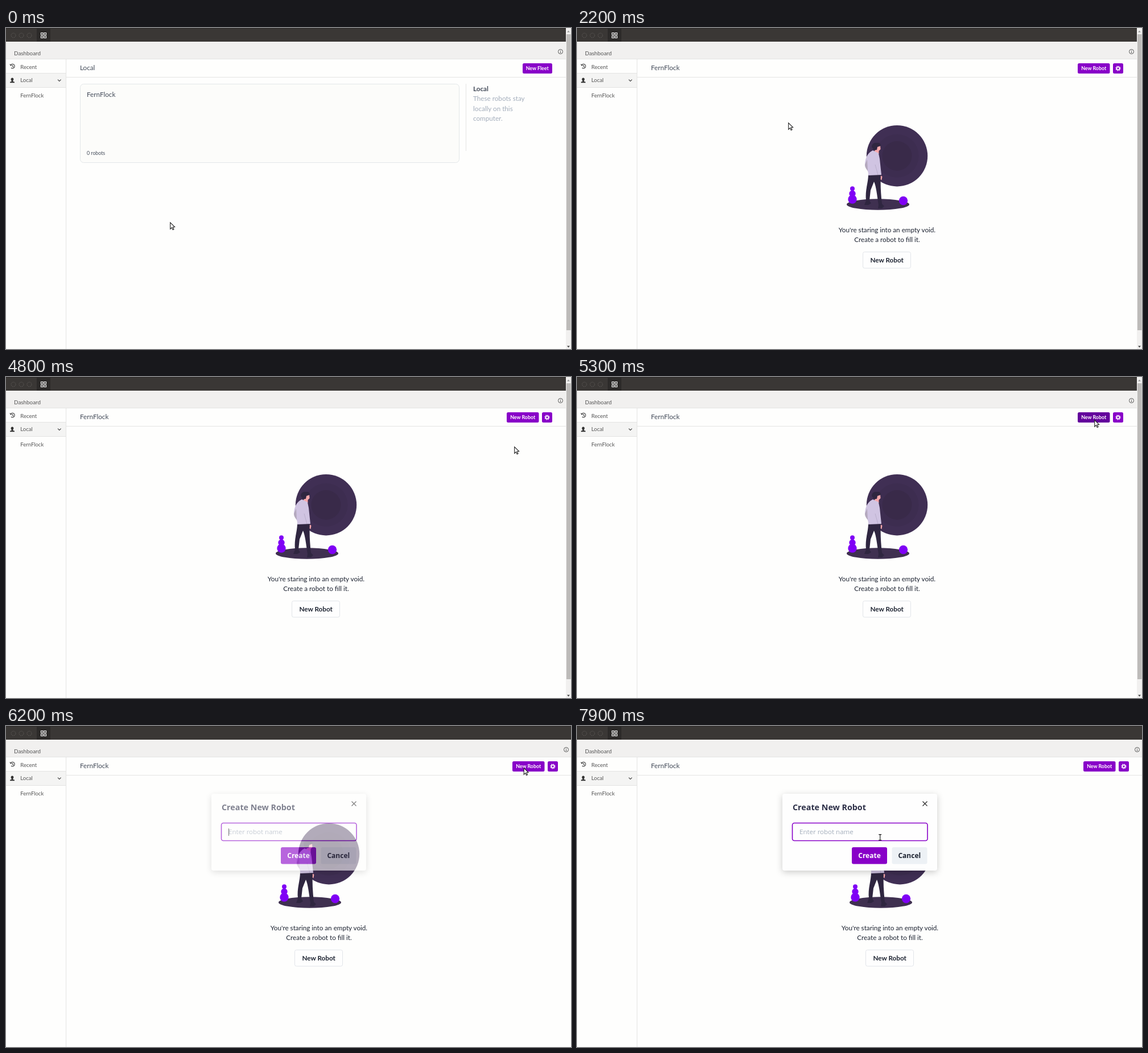
An HTML page for the animation above (8 s loop, 993 px wide and 564 px high).

```html
<!DOCTYPE html>
<html lang="en">
<head>
<meta charset="utf-8">
<title>Robot dashboard</title>
<style>
  html, body { margin: 0; width: 100%; height: 100%; overflow: hidden; background: #fefefd; }
  svg { display: block; width: 993px; height: 564px; }
  text { font: 11.7px Lato, sans-serif; fill: #424a58; }
  .side { font-size: 9.5px; fill: #555; }
  .bold { font-weight: 700; }
  .label { font-size: 8.8px; font-weight: 700; fill: #fff; }
  .mid { text-anchor: middle; }
  .muted { fill: #a3adbb; }
  .dark { fill: #1c2230; }
  .dialog text { font-family: "Open Sans", sans-serif; }
  .line { stroke: #e4e4e3; fill: none; }
  .purple { fill: #8800c8; }
  .ball { fill: #7f00f5; }
  .trousers { fill: #2f2640; }
  .skin { fill: #f8a9ad; }
</style>
</head>
<body>
<svg viewBox="0 0 993 564">
  <rect width="993" height="564" fill="#fefefd"/>

  <!-- Window chrome -->
  <rect width="993" height="24" fill="#3a3735"/>
  <rect width="993" height="1" fill="#2b2928"/>
  <rect x="54" width="24" height="24" fill="#2c2a29"/>
  <g fill="none" stroke="#5c5855" stroke-dasharray="2 1">
    <circle cx="13" cy="13" r="4"/><circle cx="27" cy="13" r="4"/><circle cx="41" cy="13" r="4"/>
  </g>
  <path d="M61.5 8.5h3.5v3.5h-3.5zM67 8.5h3.5v3.5h-3.5zM61.5 14h3.5v3.5h-3.5zM67 14h3.5v3.5h-3.5z" fill="none" stroke="#fff" stroke-width="1.1"/>
  <rect y="24" width="993" height="30" fill="#f1f0ef"/>
  <path class="line" d="M0 54.5H993M105.5 55V564M106 86.5H993"/>
  <text class="side" x="14" y="47.5" style="font-size:9.9px">Dashboard</text>
  <g id="info" fill="none" stroke="#555">
    <circle cx="974.5" cy="41.5" r="4"/><path d="M974.5 41v3M974.5 39v1"/>
  </g>

  <!-- Sidebar -->
  <rect y="79" width="105" height="26" fill="#f4f4f3"/>
  <path class="line" d="M0 79.5H105M0 104.5H105"/>
  <path d="M8.2 65a3.8 3.8 0 1 1 .8 5M6.8 63.5l1.3 2.3 2.4-.7M11.7 65v2.6l1.8 1" fill="none" stroke="#444" stroke-width="1.1"/>
  <path d="M11 87.5c3 0 2.8 4 1.2 5.2v1l2.8 1v1.5H7v-1.500l2.800-1v-1C8.200 91.500 8 87.500 11 87.500z" fill="#333"/>
  <path d="M91 90.700l2.800 2.800 2.800-2.800" fill="none" stroke="#444" stroke-width="1.200"/>
  <text class="side" x="25.300" y="72">Recent</text>
  <text class="side" x="25.300" y="95.400">Local</text>
  <text class="side" x="25.300" y="121.500">FernFlock</text>

  <!-- Fleet list -->
  <g id="fleets">
    <text x="130" y="74.300">Local</text>
    <rect class="purple" x="908" y="62" width="52" height="18" rx="2.500"/>
    <text class="label mid" x="933.700" y="74">New Fleet</text>
    <rect id="card" x="130.500" y="98.500" width="666" height="138" rx="6" stroke="#e3e7e9"/>
    <text x="142" y="121.300">FernFlock</text>
    <text x="142" y="223.200" style="font-size:8.8px">0 robots</text>
    <path class="line" d="M808.500 98V216"/>
    <text class="bold" x="821" y="110.500">Local</text>
    <text class="muted" x="821" y="128.300">These robots stay</text>
    <text class="muted" x="821" y="145.800">locally on this</text>
    <text class="muted" x="821" y="163.300">computer.</text>
  </g>

  <!-- Empty fleet -->
  <g id="fleet">
    <text x="130" y="74.300">FernFlock</text>
    <g id="actions">
      <rect id="newRobot" x="880" y="62" width="56.500" height="18" rx="2.500"/>
      <text class="label mid" x="908.200" y="74">New Robot</text>
      <rect class="purple" x="942" y="62" width="18" height="18" rx="2.500"/>
      <circle cx="951" cy="71" r="2.500" fill="none" stroke="#fff" stroke-width="1.700"/>
      <circle cx="951" cy="71" r="3.900" fill="none" stroke="#fff" stroke-width="1.400" stroke-dasharray="1.530"/>
    </g>
    <g id="empty">
      <circle cx="562.500" cy="224.700" r="53.700" fill="#402f54"/>
      <circle cx="562.500" cy="224.700" r="38" fill="#3d2d50"/>
      <circle cx="562.500" cy="224.700" r="26" fill="#392a49"/>
      <ellipse cx="529" cy="310" rx="55" ry="9.700" fill="#3f3050"/>
      <g class="ball">
        <circle cx="484" cy="282.300" r="4"/><circle cx="484" cy="291" r="5.700"/>
        <circle cx="484" cy="301" r="7.700"/><circle cx="573.500" cy="303.500" r="7.700"/>
      </g>
      <path class="skin" d="M525 206h8l.5 7-3 3v5l-8-2zM532 258l4.500 3-1 6-3-1z"/>
      <path class="trousers" d="M518 209c0-6 5-8 9-7 4-1 7 1 7 5l-6 2-1 5-5 1z"/>
      <path class="trousers" d="M512 257h22C533 275 534 291 536 309l4 4-4 4h-7l1-6C527 292 526 279 522 270L516 285 514 303l3 5-5 3h-7l3-8C506 285 512 272 512 257z"/>
      <path d="M520 215l10 5 2 10 3 28-23 1c1-7-4-12-6-18 0-11 4-21 14-26z" fill="#d0c4e2"/>
      <path d="M510 231l1 20c-3-4-5-6-5-11z" fill="#b4a9bd"/>
      <path d="M524 240l5 18" stroke="#b9aecb" fill="none"/>
      <text class="dark mid" x="545" y="358.700">You're staring into an empty void.</text>
      <text class="dark mid" x="545" y="376.200">Create a robot to fill it.</text>
      <rect x="502.500" y="393.500" width="84" height="28.500" rx="3" fill="#fefefe" stroke="#e2e5ea"/>
      <text class="dark bold mid" x="544.700" y="412">New Robot</text>
    </g>
  </g>

  <g id="scrollbar">
    <rect x="984" width="9" height="564" fill="#f1f0ef"/>
    <rect x="985" y="11" width="7.500" height="520" fill="#bdbbb9"/>
    <path d="M986 7.500l2.500-3 2.500 3z" fill="#999"/><path d="M986 558.500l2.500 3 2.500-3z" fill="#444"/>
  </g>

  <g id="dialog" class="dialog">
    <rect x="361" y="119" width="272" height="135" rx="4" fill="#fefefe" style="filter:drop-shadow(0 3px 6px #0003)"/>
    <text class="bold" x="379" y="147.500" style="font-size:14.3px;fill:#2d3048">Create New Robot</text>
    <path d="M607.500 132.500l8 8m0-8l-8 8" stroke="#333" stroke-width="1.300"/>
    <rect x="378.500" y="170.500" width="237.500" height="31" rx="3.500" fill="#fefefe" stroke="#8800c8" stroke-width="1.600"/>
    <text class="muted" x="391" y="190" style="font-size:11.5px">Enter robot name</text>
    <path id="caret" d="M391.500 180v13" stroke="#222"/>
    <rect class="purple" x="483" y="213" width="62" height="29.500" rx="3"/>
    <text class="bold mid" x="514" y="232.200" style="font-size:12px;fill:#fff">Create</text>
    <rect x="553.500" y="213" width="62" height="29.500" rx="3" fill="#edf1f5"/>
    <text class="bold mid" x="584.300" y="232.200" style="font-size:12px;fill:#1c2230">Cancel</text>
  </g>

  <g id="cursor">
    <path id="arrow" d="M.7 .8V12.200L3.400 9.700 5.200 13.500 7 12.700 5.300 8.900 8.600 8.500z" fill="#fff" stroke="#222" stroke-width="1.100"/>
    <path id="beam" d="M-2.500-5h2l.5.7.5-.7h2M-2.500 5h2l.5-.7.5.7h2M0-4.300V4.300" fill="none" stroke="#222" stroke-width="1.200"/>
  </g>
</svg>
<script>
const LOOP = 8000, STEP = 100;
const OPEN_FLEET = 2200, HOVER = 5200, PRESS = 6000, OPEN_DIALOG = 6200, TEXT_CURSOR = 7100;
const $ = id => document.getElementById(id);
const show = (id, on) => { $(id).style.display = on ? "" : "none"; };
const shift = (id, x) => $(id).setAttribute("transform", `translate(${x})`);

// Pointer path: time, x, y
const path = [
  [0, 288, 341], [600, 288, 341], [900, 330, 265], [1100, 385, 195], [1300, 371, 166],
  [3600, 371, 166], [3800, 560, 257], [3900, 621, 246],
  [4300, 621, 246], [4600, 800, 180], [4800, 893, 122], [5100, 902, 92], [5200, 907, 76],
  [5300, 909, 75], [5400, 909, 75], [5500, 909.5, 73],
  [6600, 909.5, 73], [6700, 840, 92], [6800, 761, 111], [6900, 761, 111], [7000, 640, 160],
  [7100, 549, 192], [7200, 549, 192], [7300, 538, 195.5], [7400, 532.7, 195.700], [LOOP, 532.7, 195.700]
];

function pointerAt(t) {
  const i = path.findIndex(key => key[0] > t);
  const [t0, x0, y0] = path[i - 1], [t1, x1, y1] = path[i];
  const k = (t - t0) / (t1 - t0);
  return [x0 + (x1 - x0) * k, y0 + (y1 - y0) * k];
}

function draw(now) {
  const t = Math.floor(now % LOOP / STEP) * STEP;
  const [x, y] = pointerAt(t);
  const inDialog = t >= OPEN_DIALOG;

  show("fleets", t < OPEN_FLEET);
  show("fleet", t >= OPEN_FLEET);
  show("scrollbar", !inDialog);
  show("dialog", inDialog);
  $("dialog").style.opacity = t === OPEN_DIALOG ? 0.6 : 1;
  show("caret", t < 6800 || t >= 7400 && t < 7900);
  shift("info", inDialog ? 10 : 0);
  shift("actions", inDialog ? 10 : 0);
  shift("empty", inDialog ? 5 : 0);

  $("card").setAttribute("fill", y < 236 ? "#f7f7f6" : "#fcfcfa");
  const button = $("newRobot");
  button.setAttribute("fill", t >= HOVER && !inDialog ? "#63009c" : "#8800c8");
  button.setAttribute("stroke", t >= PRESS && !inDialog ? "#c6a3e4" : "none");

  $("cursor").setAttribute("transform", `translate(${x} ${y})`);
  show("arrow", t < TEXT_CURSOR);
  show("beam", t >= TEXT_CURSOR);
}

const start = performance.now();
function frame() {
  draw(performance.now() - start);
  requestAnimationFrame(frame);
}
frame();
</script>
</body>
</html>
```
